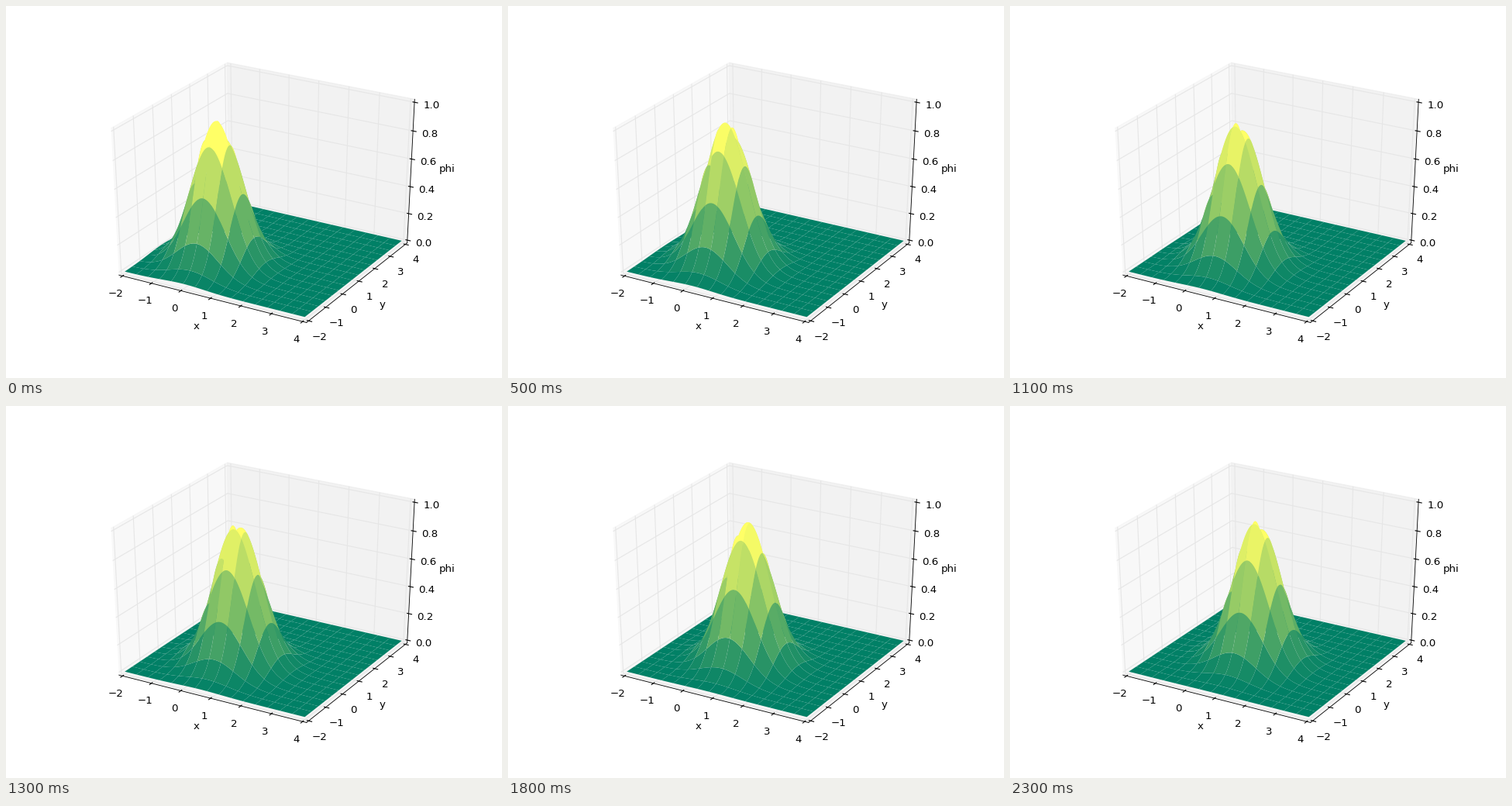
Recreate the animation shown at these times as a matplotlib script. Size 640 px wide and 480 px high, loop 2.4 s.

```python
import numpy as np
import matplotlib.pyplot as plt
from matplotlib.animation import FuncAnimation

plt.style.use("classic")
plt.rcParams.update({
    "figure.facecolor": "white",
    "savefig.dpi": "figure",
    "font.family": "DejaVu Sans",
    "axes3d.automargin": True,
})

FRAMES = 24
STEP = 0.0462  # radians per frame along the unit circle around (0, 1)

fig = plt.figure(figsize=(8, 6), dpi=80)
ax = fig.add_subplot(projection="3d")

# Equal-sided box that stretches with the axes rectangle
ax.apply_aspect = lambda position=None: None
ax.set_box_aspect((1, 1, 1), zoom=np.sqrt(3) / 1.8294640721620434)
ax.view_init(elev=30, azim=-60)

ax.set_xlim(-2, 4)
ax.set_ylim(-2, 4)
ax.set_zlim(0, 1)
ax.set_xticks(range(-2, 5))
ax.set_yticks(range(-2, 5))
ax.set_zticks(np.linspace(0, 1, 6))
ax.set_xlabel("x")
ax.set_ylabel("y")
ax.set_zlabel("phi")

axis = np.linspace(-2, 4, 151)
X, Y = np.meshgrid(axis, axis)
surface = None


def draw(i):
    global surface
    if surface is not None:
        surface.remove()
    angle = STEP * i
    cx, cy = np.sin(angle), 1 - np.cos(angle)
    phi = np.exp(-(X - cx) ** 2 - (Y - cy) ** 2)
    surface = ax.plot_surface(X, Y, phi, rstride=10, cstride=10,
                              cmap="summer", linewidth=0, antialiased=True)
    return [surface]


anim = FuncAnimation(fig, draw, frames=FRAMES, interval=100,
                     init_func=lambda: draw(0), repeat=True, repeat_delay=0)
plt.show()
```
